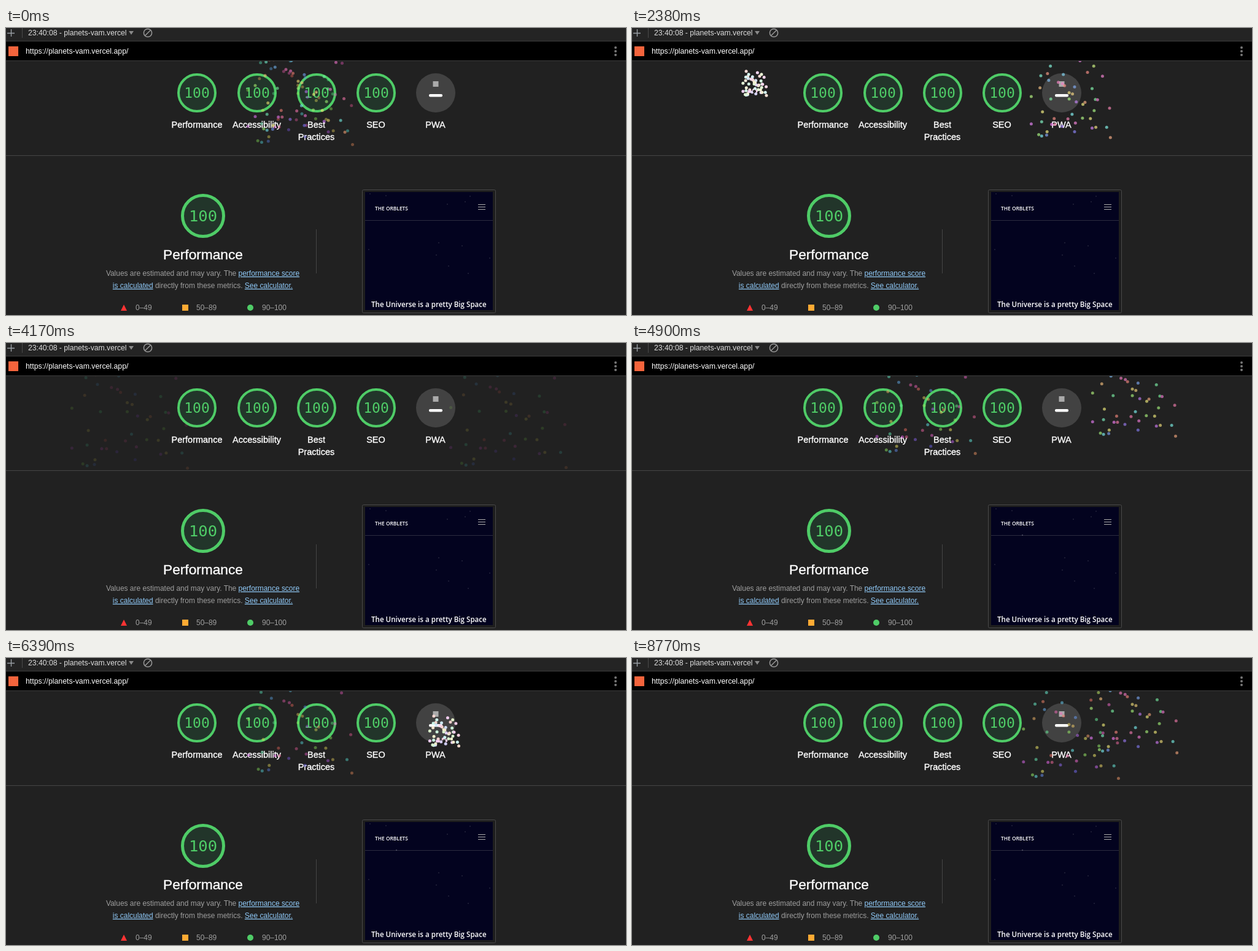
Recreate the animation shown at these times as an HTML page. Size 1010x469 px, loop 8.87 s.

```html
<!DOCTYPE html>
<html lang="en">
<head>
<meta charset="utf-8">
<title>Report</title>
<style>
html, body { margin: 0; width: 100%; height: 100%; overflow: hidden; background: #212121; }
svg { position: absolute; left: 0; top: 0; font-family: "Liberation Sans", Arial, sans-serif; }
.mid { text-anchor: middle; }
.mono { font-family: "DejaVu Sans Mono", monospace; fill: #4fcc67; }
.label { fill: #fff; stroke: #fff; stroke-width: .35; font-size: 14.5px; }
.note { fill: #9e9e9e; font-size: 11.95px; }
.link { fill: #90caf9; text-decoration: underline; }
.narrow { font-family: "Open Sans", "Noto Sans", sans-serif; font-stretch: 62.5%; font-weight: 600; fill: #fff; }
#sky { position: absolute; left: 0; top: 54px; width: 1010px; height: 415px; overflow: hidden; }
#sky div { position: absolute; width: 5px; height: 5px; border-radius: 50%; }
</style>
</head>
<body>
<svg width="1010" height="469" viewBox="0 0 1010 469">
  <rect width="1010" height="22" fill="#242424"/>
  <rect y="21" width="1010" height="33" fill="#3c3c3c"/>
  <rect y="22" width="1010" height="31" fill="#000"/>
  <path d="M2 8.5h12M8.5 2v12" stroke="#9aa0a6" stroke-width="1.4"/>
  <path d="M26.5 0v16" stroke="#4a4a4a"/>
  <text x="36" y="12" font-size="12.2" fill="#dedede">23:40:08 - planets-vam.vercel</text>
  <path d="M200 5h8l-4 6z" fill="#8a8a8a"/>
  <g fill="none" stroke="#999" stroke-width="1.5"><circle cx="231" cy="8" r="6.6"/><path d="M235.5 3.5l-9 9"/></g>
  <rect x="4" y="30" width="16" height="16" fill="#f4643c"/>
  <text x="32" y="42" font-size="12.3" fill="#fff">https://planets-vam.vercel.app/</text>
  <g fill="#777"><circle cx="993" cy="32" r="2"/><circle cx="993" cy="38" r="2"/><circle cx="993" cy="44" r="2"/></g>

  <g id="gauges"></g>
  <circle cx="700" cy="106" r="32" fill="#424242"/>
  <rect x="695.5" y="87" width="9" height="9" fill="#aaa"/>
  <rect x="689" y="108" width="22" height="4.5" rx="2" fill="#fff"/>
  <g class="label mid">
    <text x="311" y="163">Performance</text>
    <text x="408.5" y="163">Accessibility</text>
    <text x="505.5" y="163">Best</text>
    <text x="505.5" y="183">Practices</text>
    <text x="602.5" y="163">SEO</text>
    <text x="699.5" y="163">PWA</text>
    <text x="321" y="378" style="font-size:22.7px">Performance</text>
  </g>
  <path d="M0 208.5h1010M505.5 329v72" stroke="#454545"/>
  <g class="note mid">
    <text x="320.5" y="405">Values are estimated and may vary. The <tspan class="link">performance score</tspan></text>
    <text x="320.5" y="425"><tspan class="link">is calculated</tspan> directly from these metrics. <tspan class="link">See calculator.</tspan></text>
  </g>
  <path d="M192 452l5 10h-10z" fill="#f33"/>
  <rect x="287" y="452" width="10" height="10" fill="#fa3"/>
  <circle cx="398" cy="457" r="5" fill="#4fcc67"/>
  <g class="note"><text x="211" y="461">0–49</text><text x="310" y="461">50–89</text><text x="417" y="461">90–100</text></g>

  <rect x="580.5" y="264.5" width="217" height="201" rx="2" fill="#1e1e1e" stroke="#4a4a4a"/>
  <rect x="585" y="268" width="208" height="193" fill="#03031f"/>
  <path d="M585 314.5h208" stroke="#2c2c40"/>
  <path d="M769 288.5h12M769 292.5h12M769 296.5h12" stroke="#aaa"/>
  <path id="stars" fill="none" stroke="#3c3c50" stroke-width="1.6" stroke-linecap="round"
    d="M593 271h0M619 274h0M756 275h0M748 284h0M719 288h0M591 362h0M743 356h0M705 351h0M701 371h0M788 376h0M721 389h0M753 401h0"/>
  <circle id="lateStar" cx="636" cy="314" r="1" fill="#55556a"/>
  <text class="narrow" x="601" y="297.5" data-room="54">THE ORBLETS</text>
  <text class="narrow" x="595" y="456" data-room="188">The Universe is a pretty Big Space</text>
</svg>
<div id="sky"><div></div><div></div></div>
<script>
const $ = id => document.getElementById(id);

const gauge = (x, y, r, line, size) => `
  <circle cx="${x}" cy="${y}" r="${r - line / 2}" fill="#22352a" stroke="#4fcc67" stroke-width="${line}"/>
  <text class="mono mid" x="${x}" y="${y + size * .365}" font-size="${size}">100</text>`;
$('gauges').innerHTML = [311, 409, 506, 603].map(x => gauge(x, 106, 32, 4, 23)).join('')
  + gauge(321, 307, 36, 5, 25.5);

// choose the font size that suits the room
for (const el of document.querySelectorAll('[data-room]')) {
  el.style.fontSize = '20px';
  el.style.fontSize = 20 * el.dataset.room / el.getComputedTextLength() + 'px';
}

// sparks: x, y, hue
const sparks = [
  -70,-116,163, -28,-100,326, 58,-32,100, 13,-2,314, -19,6,256, -2,-75,51, 24,-152,304,
  57,-139,80, -51,-105,208, 62,8,50, -93,0,292, -16,-119,196, 53,-85,142, 66,-58,316,
  -93,-66,93, 30,-14,97, -2,-60,98, -44,1,300, 61,-59,136, 5,-23,181, -66,-29,57,
  42,-124,5, -75,26,101, 15,-53,273, 36,-52,22, -38,-13,5, -46,-60,141, 78,-115,318,
  -36,1,338, -72,-87,33, 31,-47,57, -68,29,183, -55,19,56, -56,27,223, -13,-92,5,
  -47,-139,167, -18,-97,323, 11,-89,218, 53,10,282, 11,19,244, -5,-12,333, -68,-5,155,
  95,-38,335, -67,-163,8, -54,-121,12, 49,-13,56, 88,8,174, 97,33,21, 6,-72,43
];
const centres = [[477, 112], [302, 141], [713, 132], [199.4, 101], [816, 101]];

// cubic-bezier(0, 0, .58, 1)
function easeOut(p) {
  let lo = 0, hi = 1;
  for (let i = 0; i < 24; i++) {
    const t = (lo + hi) / 2;
    if (1.74 * (1 - t) * t * t + t ** 3 < p) lo = t; else hi = t;
  }
  return 3 * (1 - lo) * lo * lo + lo ** 3;
}
const easeIn = p => 1 - easeOut(1 - p);

function burst(el, turns) {
  const n = Math.floor(turns), p = turns - n;
  const spread = easeOut(p), fall = easeIn(p);
  const [x, y] = centres[n % 5];
  const shadows = [];
  for (let i = 0; i < sparks.length; i += 3) {
    const dx = sparks[i] * spread, dy = (sparks[i + 1] + .33) * spread;
    shadows.push(`${dx.toFixed(2)}px ${dy.toFixed(2)}px hsl(${sparks[i + 2]},80%,${(100 - 40 * spread).toFixed(1)}%)`);
  }
  el.style.left = x - 2.5 + 'px';
  el.style.top = y - 56.5 + 80 * fall + 'px';
  el.style.opacity = 1 - fall;
  el.style.boxShadow = shadows.join();
}

const [first, second] = $('sky').children;
const start = performance.now();
let shown = -1;
function draw(now) {
  const t = Math.max(0, now - start) % 8870;
  const step = Math.floor((t + 12) / 148.8);
  if (step !== shown) {
    shown = step;
    const sec = step * .14934;
    burst(first, .737 + sec);
    burst(second, .583 + sec / 1.25);
    $('lateStar').style.display = step < 32 ? 'none' : '';
  }
  requestAnimationFrame(draw);
}
draw(start);
</script>
</body>
</html>
```
